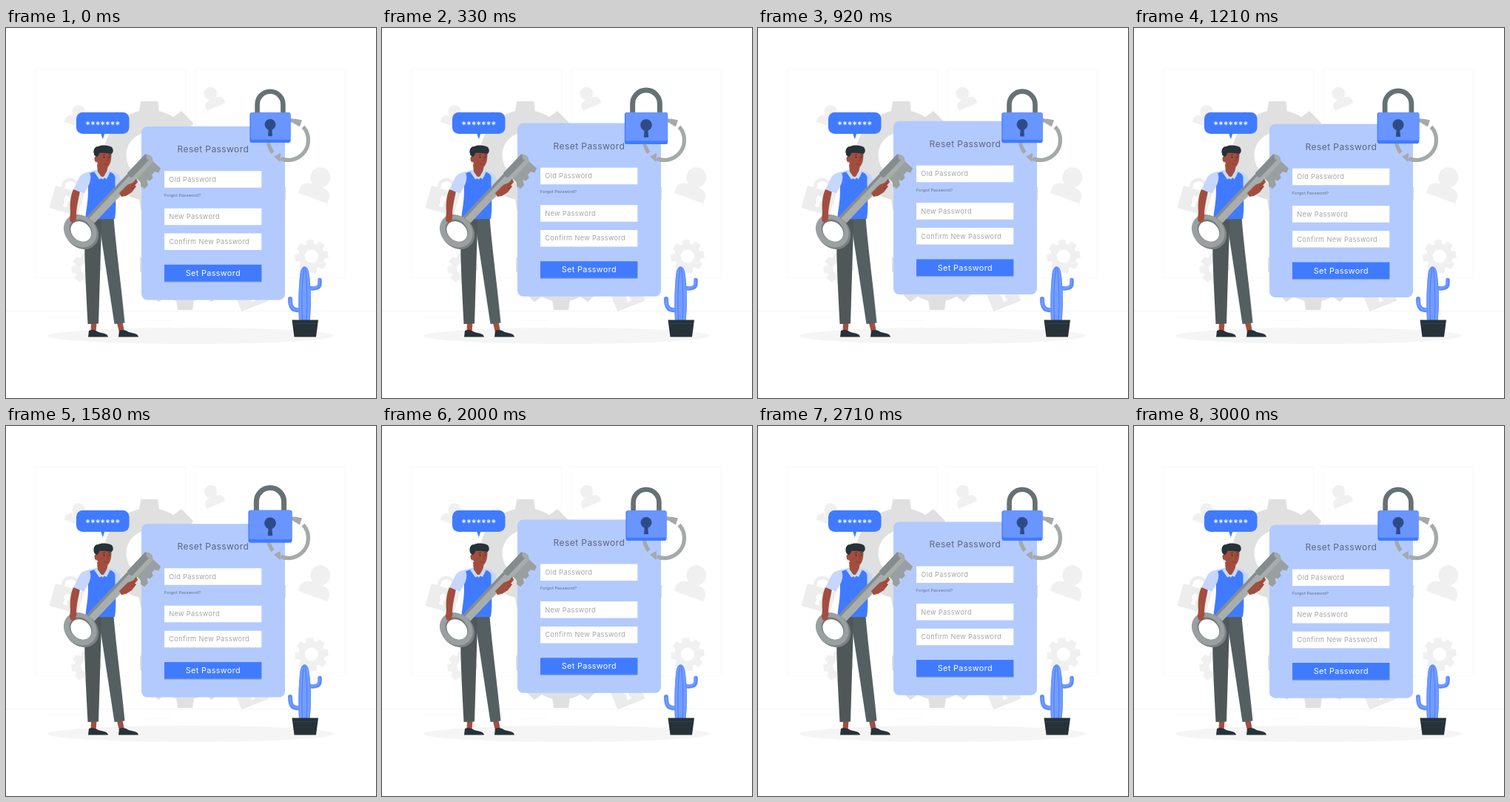
Recreate the animation shown at these times as an HTML page with a canvas. Size 500 by 500 pixels, loop 3.04 s.

```html
<!DOCTYPE html>
<html lang="en">
<head>
<meta charset="utf-8">
<title>Reset Password</title>
<style>
html, body { margin: 0; width: 100%; height: 100%; overflow: hidden; background: #fff; }
canvas { display: block; width: 500px; height: 500px; }
</style>
</head>
<body>
<canvas id="stage"></canvas>
<script>
const canvas = document.getElementById('stage');
const ctx = canvas.getContext('2d');
const dpr = window.devicePixelRatio || 1;
canvas.width = canvas.height = 500 * dpr;

const LOOP = 3040, BOB = 1520, BEAT = 1000;
const BLUE = '#407bff', SKIN = '#a24e3f', DARK = '#263238';
const FONT = 'Inter, "Open Sans", sans-serif';

function fill(color, d) {
  ctx.fillStyle = color;
  ctx.fill(new Path2D(d));
}

function line(color, width, d) {
  ctx.strokeStyle = color;
  ctx.lineWidth = width;
  ctx.stroke(new Path2D(d));
}

function box(color, x, y, w, h, r = 0) {
  ctx.fillStyle = color;
  ctx.beginPath();
  ctx.roundRect(x, y, w, h, r);
  ctx.fill();
}

function oval(color, x, y, rx, ry = rx, turn = 0) {
  ctx.fillStyle = color;
  ctx.beginPath();
  ctx.ellipse(x, y, rx, ry, turn, 0, 7);
  ctx.fill();
}

function arc(color, width, x, y, r, from, to) {
  ctx.strokeStyle = color;
  ctx.lineWidth = width;
  ctx.beginPath();
  ctx.arc(x, y, r, from * Math.PI / 180, to * Math.PI / 180);
  ctx.stroke();
}

function text(str, x, y, size, color, weight = 400, align = 'left') {
  ctx.font = `${weight} ${size}px ${FONT}`;
  ctx.letterSpacing = `${size * 0.035}px`;
  ctx.textAlign = align;
  ctx.fillStyle = color;
  ctx.fillText(str, x, y);
}

function at(x, y, deg, scale, draw) {
  ctx.save();
  ctx.translate(x, y);
  ctx.rotate(deg * Math.PI / 180);
  ctx.scale(scale, scale);
  draw();
  ctx.restore();
}

function gear(x, y, body, tip, hole, tooth, color, turn = 0) {
  at(x, y, turn, 1, () => {
    for (let i = 0; i < 8; i++) {
      ctx.rotate(Math.PI / 4);
      const a = tooth / 2, b = tooth * 0.6;
      fill(color, `M${-a} ${-tip}H${a}L${b} ${3 - body}H${-b}Z`);
    }
    arc(color, body - hole, 0, 0, (body + hole) / 2, 0, 360);
  });
}

function person(x, y, deg, scale, color) {
  at(x, y, deg, scale, () => {
    oval(color, 0, -30, 13.5);
    fill(color, 'M-21 0V-8C-20 -17 -9 -20 0 -17C9 -20 20 -17 21 -8V0Z');
  });
}

function paleLock(x, y, deg, color) {
  at(x, y, deg, 1, () => {
    line(color, 4.5, 'M-10 -14V-19C-10 -32 10 -32 10 -19V-14');
    box(color, -20, -15, 40, 31, 1.5);
    oval('#fff', 0, -2, 4);
    fill('#fff', 'M-1.5 0H1.5L3 9H-3Z');
  });
}

function backdrop() {
  box('#fff', 0, 0, 500, 500);
  ctx.strokeStyle = '#f9f9f9';
  ctx.lineWidth = 1;
  ctx.strokeRect(39.5, 55.5, 203, 282);
  ctx.strokeRect(255.5, 55.5, 203, 282);
  line('#f5f5f5', 1, 'M0 382.5H500');
  line('#fafafa', 1, 'M52 390.5H106M189 395.5H225');

  person(91.4, 131.3, 20, 0.65, '#f0f0f0');
  person(284, 106.5, -23, 0.65, '#f0f0f0');
  person(414.5, 230, 20, 1, '#f0f0f0');
  gear(413, 308.5, 17.5, 22.5, 9, 9, '#f0f0f0', -6);
  gear(109, 325, 16, 20.5, 8, 9, '#f0f0f0', -6);
  paleLock(82, 233, 16, '#ededed');
  paleLock(331, 361, -22, '#ebebeb');

  oval('#f5f5f5', 249.6, 416, 193.5, 11);
  gear(193.5, 172, 61, 73, 31, 23, '#e0e0e0');
  gear(242, 320, 50, 61, 24, 20, '#e0e0e0');
  box('#e0e0e0', 366, 215, 12.3, 17);
}

function field(label, y) {
  box('#fff', 214, y, 131.3, 22.5);
  text(label, 220.3, y + 14.5, 9.2, '#a6a6a6');
}

function panel(rise) {
  const ink = '#5c6780';
  at(0, -rise, 0, 1, () => {
    box('#b3caff', 183, 133.5, 194, 234.3, 8);
    text('Reset Password', 279.9, 168.5, 12, ink, 400, 'center');
    field('Old Password', 193.6);
    text('Forgot Password?', 214, 228.4, 5.45, ink);
    field('New Password', 244.1);
    field('Confirm New Password', 277.9);
    box('#8aa3d8', 214, 321, 131.3, 23);
    box(BLUE, 214, 320.2, 131.3, 22.6);
    text('Set Password', 279.8, 335.4, 10.8, '#fff', 400, 'center');
  });
}

function arrows() {
  const grey = '#a6a9a9';
  arc(grey, 5.3, 381.5, 151.5, 27, -42, 112);
  fill(grey, 'M362 173.5L371 169L370.5 181.5Z');
  arc(grey, 5.3, 381.5, 151.5, 27, 141, 190);
  arc(grey, 5.3, 381.5, 151.5, 27, -100, -66);
  fill(grey, 'M390 122.5L400 124.5L397 133.5L389 129Z');
}

function padlock(scale) {
  at(357, 119, 0, scale, () => {
    ctx.translate(-357, -119);
    line('#667173', 6.6, 'M339.6 116V103.2A17.4 17.4 0 0 1 374.4 103.2V116');
    box(BLUE, 329.4, 114.2, 55.2, 40.9, 3);
    box('#6895ff', 330.6, 114.2, 54, 36.6, 2.5);
    oval('#2f4b87', 357, 130.5, 7.4);
    fill('#2f4b87', 'M354.8 135H359.2L360 146.3H354Z');
  });
}

function bubble() {
  box(BLUE, 95, 114, 71.5, 29, 8.5);
  fill(BLUE, 'M128 142H133.5L130.8 150.5Z');
  ctx.font = `500 13px ${FONT}`;
  const m = ctx.measureText('*');
  const y = 129 + (m.actualBoundingBoxAscent - m.actualBoundingBoxDescent) / 2;
  for (let i = 0; i < 7; i++) text('*', 110.8 + i * 6.72, y, 13, '#fff', 500, 'center');
}

function body() {
  // feet and legs
  fill(SKIN, 'M115 398H122.5L121.5 411H114.5ZM149.5 397H157.5L160 411H153Z');
  fill(DARK, 'M112 409C117 407 121 408.5 124 410.5C129 412.5 137 412 138 417.5H111Z');
  fill(DARK, 'M153 409C158 407 162 408.5 165 410.5C170 412.5 178 412 179 417.5H152Z');
  fill('#545f62', 'M121 257H145.5C149 300 156 350 160.5 398.5L146.5 400L128 278Z');
  fill('#505759', 'M106.5 257H129L128.5 285L125 399.5L110.5 400C108 350 105 300 106.5 257Z');

  // neck, vest, sleeves
  fill('#c5d7ff', 'M109 195L121 192L143 193L153 199L158 213L147 219L112 224Z');
  fill(BLUE, 'M109 198C112 196 117 195 120.5 194L131 205L138 194C143 195 146 197 147.5 201C147 221 150 239 147 258L107.5 258.5C108 242 114 227 109 198Z');
  fill(SKIN, 'M123 184H138L136 197C133 202 128 203 124 196Z');
  fill('#c9daff', 'M122 191L130 203L126 204.5L119.5 195ZM137 192L131.5 202L136 204L140.5 195Z');
  fill(SKIN, 'M91 218L100 220C98 232 95 242 95 254L93 263H86L87 250C86 238 87 227 91 218Z');
  fill('#c5d7ff', 'M112 195C105 195 100 199 98 204L91.5 218L105.5 224L112.5 211C115 204 115 198 112 195Z');

  // head
  fill(SKIN, 'M122.5 171C121 181 125 187 131 189.5C139 190 143 183 142.5 167L136 163L125 165Z');
  oval(SKIN, 122.5, 177, 3, 4);
  fill(DARK, 'M123 174.5L119.5 172C117 166 119 160 125 160C130 157.5 139 158.5 143 161C146 165 144.5 169 142.5 170C137 169 132 169 127 168.5Z');
  oval(DARK, 132.5, 174.9, 0.8, 1.1);
  oval(DARK, 139.5, 174.5, 0.8, 1.1);
  line(DARK, 0.8, 'M130.5 172L134 171M138 171L141 171.6');
  line('#7d352b', 0.8, 'M136.5 174L138.5 179L136 179.5M132 183C134.5 185 137 184.5 138.5 183');
}

function key() {
  // x runs along the shaft, y towards the bit
  at(101, 273.5, -46.6, 1, () => {
    fill('#9a9fa0', 'M103 6H135V21L129 23L126 18H121L119 22H113L111 18L107 24H100L99 18L103 14Z');
    box('#a8adad', 18, -6.5, 90, 13);
    box('#868c8d', 18, -6.5, 90, 3.5);
    box('#a8adad', 98, -7.5, 38, 15, 3);
    box('#868c8d', 98, -7.5, 38, 9, 3);
    oval('#a6abab', 135, 0, 3.2, 5.5);

    oval('#7b8183', -1, 3, 21, 24.5);
    oval('#9a9fa0', -1, 0, 20.5, 24);
    oval('#747a7c', 0, 0, 13.5, 16.5);
    oval('#fff', -0.8, 1.2, 12.3, 15.2);
  });
}

function hands() {
  fill(SKIN, 'M87 249C90 247 95 249 95.5 253L94 261C91 264 87 263 86 259Z');
  fill(SKIN, 'M157 219L164 212L171 209L176 204L178 208L174 213L176 214L170 222L162 227L156 228L153 223Z');
  line('#7d352b', 0.7, 'M169 213L174 210M170 217L175 213.5');
}

function cactus() {
  const pale = '#739dff', shade = '#5c8cff';
  ctx.lineCap = 'round';
  line(shade, 5.5, 'M409 351.5C419 353 424 351 424 345V340.5');
  line(pale, 2.4, 'M411 351.5C419 352 423 350 423 341');
  line(shade, 6, 'M398 381C387 382 384 378 384 366');
  line(pale, 2.4, 'M397 380.5C388 381 384 378 384 367');
  ctx.lineCap = 'butt';
  fill(pale, 'M396 395C394.5 370 396 340 398 329C400 320 407 320 409 329C412 345 413 372 410.5 395Z');
  line(BLUE, 0.9, 'M400.5 395C399 370 400 345 402.5 324M406 395C408 370 406.5 345 404.5 324');
  line(shade, 1, 'M396.5 395C395 370 396.5 340 398.5 329C400 321 407 321 408.5 329C411.5 345 412.5 372 410 395');
  fill(DARK, 'M386.5 394.5H422L419 417.5H389.5Z');
  line('#37474f', 0.8, 'M387.5 399.5H421');
}

function draw(now) {
  const t = now % LOOP;
  const p = ((t + 30) % BOB) / BOB;
  const rise = 10.4 * (1 - Math.abs(2 * p - 1));
  const beat = t < 2 * BEAT ? Math.sin(Math.PI * t / BEAT) ** 2 : 0;

  ctx.setTransform(dpr, 0, 0, dpr, 0, 0);
  backdrop();
  panel(rise);
  arrows();
  padlock(1 + 0.075 * beat);
  bubble();
  body();
  key();
  hands();
  cactus();
}

const start = performance.now();
function tick() {
  draw(performance.now() - start);
  requestAnimationFrame(tick);
}
tick();
</script>
</body>
</html>
```
